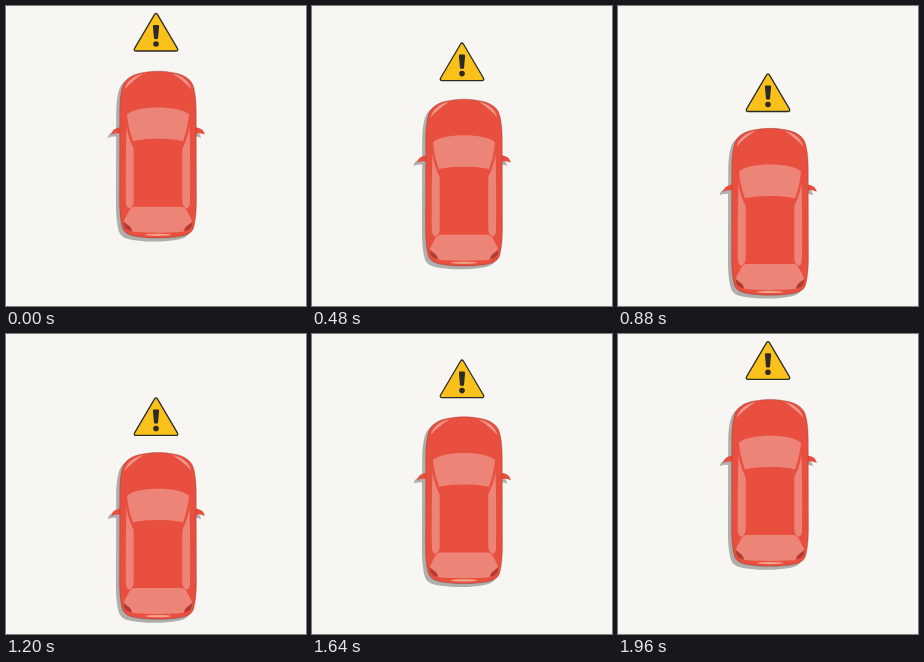
These frames come from a looping animation (300 by 300 pixels, 2 s). An HTML page with a canvas:

```html
<!DOCTYPE html>
<html lang="en">
<head>
<meta charset="utf-8">
<title>Car warning</title>
<style>
html, body { margin: 0; width: 100%; height: 100%; overflow: hidden; background: #f7f6f2; }
canvas { display: block; width: 300px; height: 300px; }
</style>
</head>
<body>
<canvas id="stage"></canvas>
<script>
const LOOP = 2000, STEP = 40;
const RED = '#e84f3f', GLASS = '#ed8478', SHADOW = '#afaeab', INK = '#2b2a29';
const canvas = document.getElementById('stage');
const ctx = canvas.getContext('2d');
const dpr = window.devicePixelRatio || 1;
canvas.width = canvas.height = Math.round(300 * dpr);

// Car coordinates: x is measured from the centre line.
const body = new Path2D(
  'M0 65.2 C5 65.2 9 65.6 12 66.2 C22 67 31 71 34.5 78 C37 84 38 93 38.2 103' +
  ' L38.4 190 C38.6 203 37.8 214 35.5 222 C33.5 228 27 230 18 231 C10 232 5 232 0 232' +
  ' C-5 232 -10 232 -18 231 C-27 230 -33.5 228 -35.5 222 C-37.8 214 -38.6 203 -38.4 190' +
  ' L-38.2 103 C-38 93 -37 84 -34.5 78 C-31 71 -22 67 -12 66.2 C-9 65.6 -5 65.2 0 65.2 Z');
const mirror = new Path2D(
  'M37.5 121.5 C42 121.5 45.5 123.5 46.8 128.6 C43.5 127.2 40.5 126.8 37.5 127.5 Z');
const windshield = new Path2D(
  'M-31 108.5 C-22 99 22 99 31 108.5 C30.5 117 28 127 25 135.2' +
  ' C12 132 -12 132 -25 135.2 C-28 127 -30.5 117 -31 108.5 Z');
const rearWindow = new Path2D(
  'M-24 200.8 L24 200.8 Q27 201 28.5 204 L34 214.5 C33 221 29 225 23 226' +
  ' Q0 227.5 -23 226 C-29 225 -33 221 -34 214.5 L-28.5 204 Q-27 201 -24 200.8 Z');
const sideWindow = new Path2D(
  'M31.5 120 C32.2 140 32.4 180 32 197 Q31.5 202 28.5 202.5 Q24.5 201 24.3 195' +
  ' L24.3 143 C26.5 138 30 131 31.5 120 Z');
const headlight = new Path2D(
  'M14.5 67.6 C24 70 31.5 75 33.2 83.5 C29 78 23 73 14.5 67.6 Z');
const tailLight = new Path2D(
  'M34.2 216 C34.5 221 31.5 224.6 26 225.2 C26.5 221.5 29 219.5 34.2 216 Z');
const sign = new Path2D(
  'M148.6 8.4 Q150 6.4 151.4 8.4 L171.4 42.4 Q172.6 45 169.8 45 L130.2 45 Q127.4 45 128.6 42.4 Z');

function fill(path, color) {
  ctx.fillStyle = color;
  ctx.fill(path);
}

function at(x, y, draw) {
  ctx.save();
  ctx.translate(x, y);
  draw();
  ctx.restore();
}

function pair(path, color) {
  fill(path, color);
  ctx.save();
  ctx.scale(-1, 1);
  fill(path, color);
  ctx.restore();
}

function drawCar() {
  at(-3.6, 3.4, () => {
    fill(body, SHADOW);
    pair(mirror, SHADOW);
  });
  pair(mirror, RED);
  fill(body, RED);
  ctx.strokeStyle = 'rgba(100, 45, 38, 0.5)';
  ctx.lineWidth = 0.6;
  ctx.stroke(body);
  pair(headlight, '#f0998e');
  fill(windshield, GLASS);
  pair(sideWindow, GLASS);
  fill(rearWindow, GLASS);
  pair(tailLight, '#b3382f');
  ctx.fillStyle = '#f2a58c';
  ctx.beginPath();
  ctx.ellipse(0, 228.8, 13, 1.1, 0, 0, Math.PI * 2);
  ctx.fill();
}

function drawSign() {
  fill(sign, '#fbc11b');
  ctx.strokeStyle = INK;
  ctx.lineWidth = 1.3;
  ctx.lineJoin = 'round';
  ctx.stroke(sign);
  fill(new Path2D('M148.2 19 H151.8 Q153.2 19 153.1 20.4 L152 32.6 Q150 34 148 32.6 L146.9 20.4 Q146.8 19 148.2 19 Z'), INK);
  ctx.beginPath();
  ctx.arc(150, 38, 2.8, 0, Math.PI * 2);
  ctx.fill();
}

const smooth = u => u * u * (3 - 2 * u);

function render(now) {
  const t = Math.floor((now % LOOP) / STEP) * STEP / (LOOP / 2);
  const p = smooth(t < 1 ? t : 2 - t);
  ctx.setTransform(dpr, 0, 0, dpr, 0, 0);
  ctx.fillStyle = '#f7f6f2';
  ctx.fillRect(0, 0, 300, 300);
  at(152, 59.5 * p, drawCar);
  at(0, 63 * p, drawSign);
}

let start;
function tick(now) {
  if (start === undefined) start = now;
  render(now - start);
  requestAnimationFrame(tick);
}
render(0);
requestAnimationFrame(tick);
</script>
</body>
</html>
```
